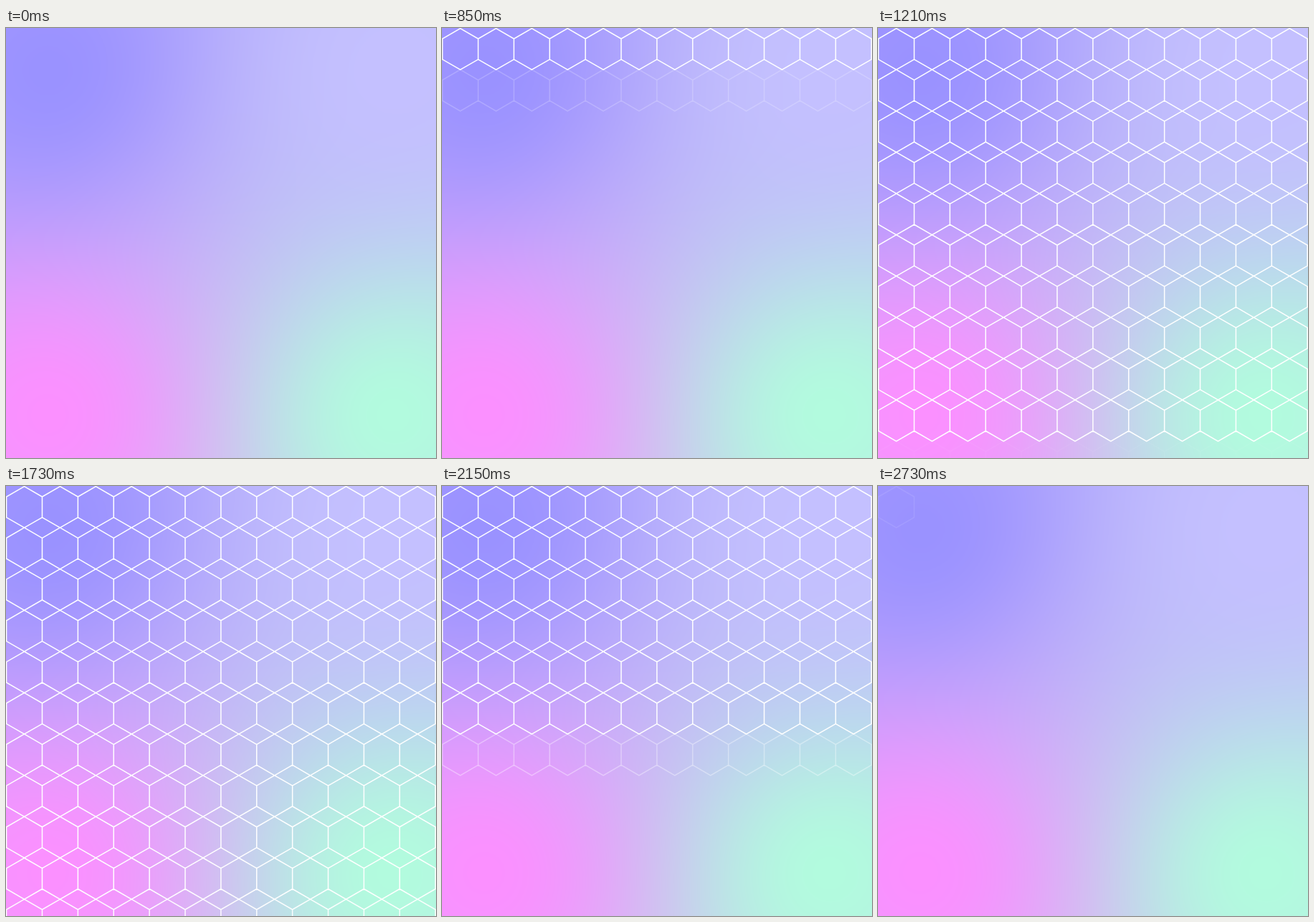
Animation of 600x600 px, one loop 2940 ms. Source, as an HTML page with a canvas:

```html
<!DOCTYPE html>
<html lang="en">
<head>
<meta charset="utf-8">
<title>Hexagon grid</title>
<style>
  html, body { margin: 0; width: 100%; height: 100%; overflow: hidden; }
  canvas { display: block; width: 600px; height: 600px; }
</style>
</head>
<body>
<canvas id="stage" width="600" height="600"></canvas>
<script>
const SIZE = 600, LOOP = 2940, STEP = 70;
const COLS = 12, ROWS = 11;
const RADIUS = 28.8, HALF_WIDTH = RADIUS * Math.sqrt(3) / 2;
const INSET = 0.6;

const ctx = document.getElementById('stage').getContext('2d');

const clamp01 = v => Math.min(1, Math.max(0, v));
const progress = (t, start, end) => clamp01((t - start) / (end - start));

// Visible copies; a fraction fades the last one.
const columnCount = t =>
  COLS * (progress(t, 200, 560) - progress(t, 2348, 2733));
const rowCount = t =>
  1 + (ROWS - 1) * (progress(t, 832, 1228) - progress(t, 1675, 2590));

// Four colour points blended by inverse squared distance.
function makeBackground() {
  const points = [
    { x: 60, y: 60, rgb: [154, 146, 255] },
    { x: 540, y: 60, rgb: [196, 192, 255] },
    { x: 60, y: 540, rgb: [251, 144, 255] },
    { x: 540, y: 540, rgb: [178, 251, 222] }
  ];
  const layer = document.createElement('canvas');
  layer.width = layer.height = SIZE;
  const layerCtx = layer.getContext('2d');
  const image = layerCtx.createImageData(SIZE, SIZE);
  for (let y = 0, k = 0; y < SIZE; y++) {
    for (let x = 0; x < SIZE; x++, k += 4) {
      const weights = points.map(p =>
        1 / ((x + 0.5 - p.x) ** 2 + (y + 0.5 - p.y) ** 2));
      const total = weights.reduce((sum, w) => sum + w);
      for (let c = 0; c < 3; c++) {
        image.data[k + c] =
          points.reduce((sum, p, i) => sum + weights[i] * p.rgb[c], 0) / total;
      }
      image.data[k + 3] = 255;
    }
  }
  layerCtx.putImageData(image, 0, 0);
  return layer;
}

function addHexagon(col, row) {
  const cx = INSET + HALF_WIDTH * (2 * col + 1);
  const cy = INSET + RADIUS * (2 * row + 1);
  for (let i = 0; i < 6; i++) {
    const angle = i * Math.PI / 3;
    const x = cx + RADIUS * Math.sin(angle), y = cy - RADIUS * Math.cos(angle);
    if (i) ctx.lineTo(x, y); else ctx.moveTo(x, y);
  }
  ctx.closePath();
}

// One path per run of hexagons, so shared edges are not painted twice.
function strokeRun(row, fromCol, toCol, alpha) {
  ctx.globalAlpha = alpha;
  ctx.beginPath();
  for (let col = fromCol; col < toCol; col++) addHexagon(col, row);
  ctx.stroke();
}

const background = makeBackground();

function draw(time) {
  const t = Math.floor(time / STEP) * STEP;
  const columns = columnCount(t), rows = rowCount(t);
  const fullColumns = Math.floor(columns);

  ctx.globalAlpha = 1;
  ctx.drawImage(background, 0, 0);
  ctx.strokeStyle = '#fff';
  ctx.lineWidth = 1.5;
  for (let row = 0; row < rows; row++) {
    const alpha = clamp01(rows - row);
    strokeRun(row, 0, fullColumns, alpha);
    strokeRun(row, fullColumns, Math.ceil(columns), alpha * (columns - fullColumns));
  }
}

const start = performance.now();
function loop() {
  draw((performance.now() - start) % LOOP);
  requestAnimationFrame(loop);
}
loop();
</script>
</body>
</html>
```
